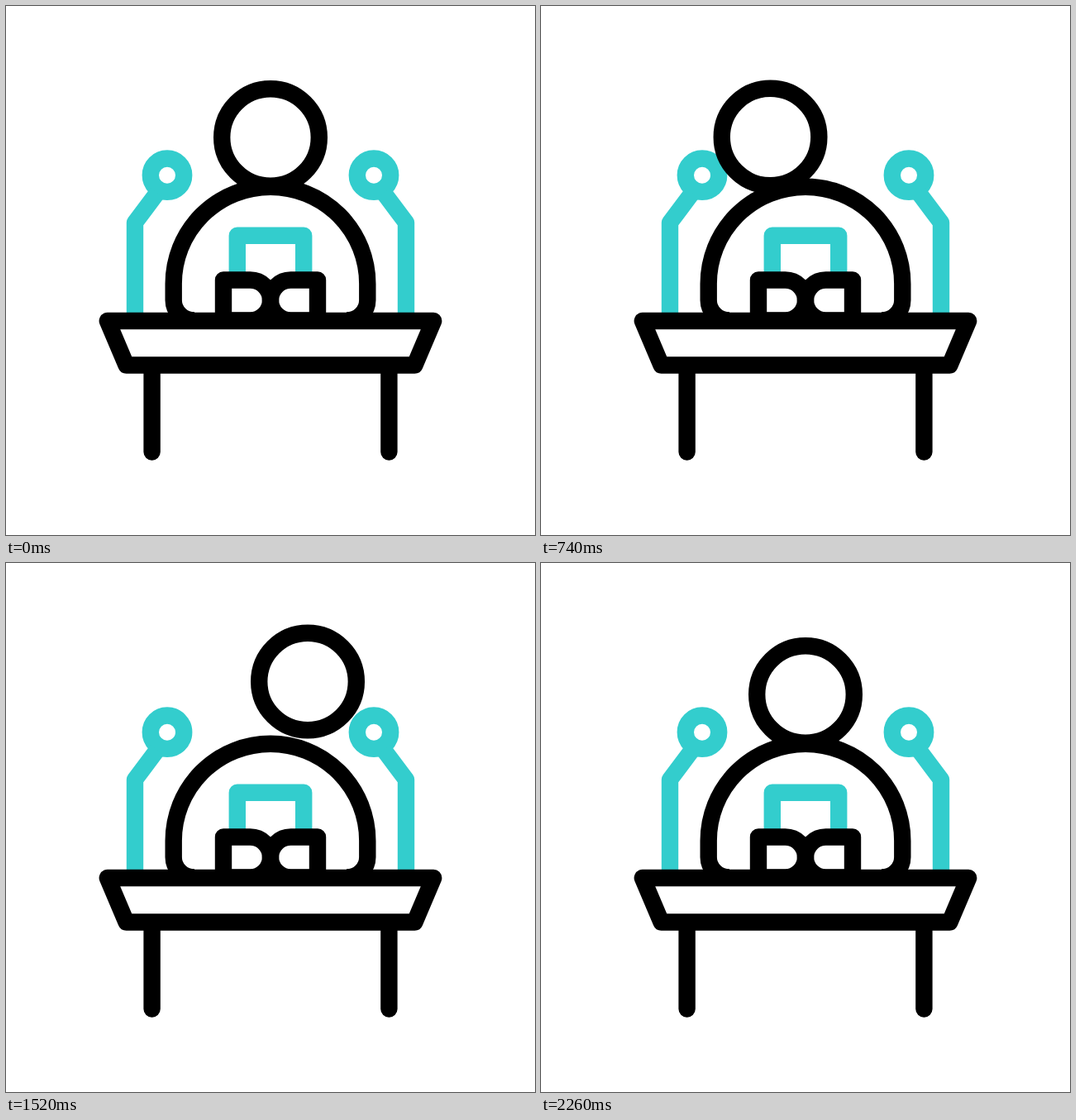
Write an HTML page that moves like this. It is 640 by 640 pixels and loops after 2400 ms.

```html
<!DOCTYPE html>
<html lang="en">
<head>
<meta charset="utf-8">
<title>Speaker at a desk</title>
<style>
  html, body { margin: 0; width: 100%; height: 100%; overflow: hidden; background: #fff; }
  svg { display: block; width: 100%; height: 100%; }
  g { fill: none; stroke: #000; stroke-width: 20.4; stroke-linejoin: round; }
  .accent { stroke: #33cdcd; }
  .legs { stroke-linecap: round; }
</style>
</head>
<body>
<svg viewBox="0 0 640 640">
  <defs>
    <g id="mic" class="accent">
      <circle cx="195" cy="204.7" r="20.2"/>
      <path d="M183 226 L156 262 V376"/>
    </g>
    <path id="page" d="M263 331.5 H295.5 A24.5 24.5 0 0 1 295.5 380.5 H263 Z"/>
  </defs>
  <use href="#mic"/>
  <use href="#mic" transform="matrix(-1 0 0 1 640 0)"/>
  <g><path d="M228 380.5 A25.5 24.5 0 0 1 202.7 356 V336 A117.3 117.3 0 0 1 437.3 336 V356 A25.5 24.5 0 0 1 412 380.5"/></g>
  <g id="book">
    <path class="accent" d="M279.8 328 V277.8 H360.2 V328"/>
    <use href="#page"/>
    <use href="#page" transform="matrix(-1 0 0 1 640 0)"/>
  </g>
  <g id="head"><circle cx="320" cy="159" r="58.8"/></g>
  <g>
    <path d="M122.8 381 H517.2 L494.5 434.5 H145.5 Z"/>
    <path class="legs" d="M176.6 436 V539.5 M463.4 436 V539.5"/>
  </g>
</svg>
<script>
const LOOP = 2400;
// Each key: time in ms, x offset, y offset
const headKeys = [
  [0, 0, 0], [280, -35.5, -1], [550, -46, -20.5], [740, -42.5, -0.5],
  [1240, -5, -2], [1520, 45, -15.5], [1620, 46.5, -16], [1720, 47, -20.5],
  [1880, 42.5, -10.5], [2160, 9, -6.5], [2260, 0, 0]
];
const bookKeys = [[1540, 0, 0], [1880, 0, -18], [2220, 0, 0]];

const slope = (keys, i, axis) =>
  (keys[i + 1][axis] - keys[i][axis]) / (keys[i + 1][0] - keys[i][0]);

// Smooth tangent that never overshoots a key
function tangent(keys, i, axis) {
  if (i === 0 || i === keys.length - 1) return 0;
  const a = slope(keys, i - 1, axis), b = slope(keys, i, axis);
  return a * b > 0 ? 2 * a * b / (a + b) : 0;
}

function valueAt(keys, time, axis) {
  const last = keys.length - 1;
  if (time <= keys[0][0]) return keys[0][axis];
  if (time >= keys[last][0]) return keys[last][axis];
  const i = keys.findIndex(key => key[0] > time) - 1;
  const span = keys[i + 1][0] - keys[i][0];
  const u = (time - keys[i][0]) / span, v = 1 - u;
  return v * v * (1 + 2 * u) * keys[i][axis] + u * u * (3 - 2 * u) * keys[i + 1][axis]
    + span * u * v * (v * tangent(keys, i, axis) - u * tangent(keys, i + 1, axis));
}

function place(id, keys, time) {
  const x = valueAt(keys, time, 1), y = valueAt(keys, time, 2);
  document.getElementById(id).setAttribute('transform', `translate(${x} ${y})`);
}

function draw() {
  const time = performance.now() % LOOP;
  place('head', headKeys, time);
  place('book', bookKeys, time);
  requestAnimationFrame(draw);
}
draw();
</script>
</body>
</html>
```
